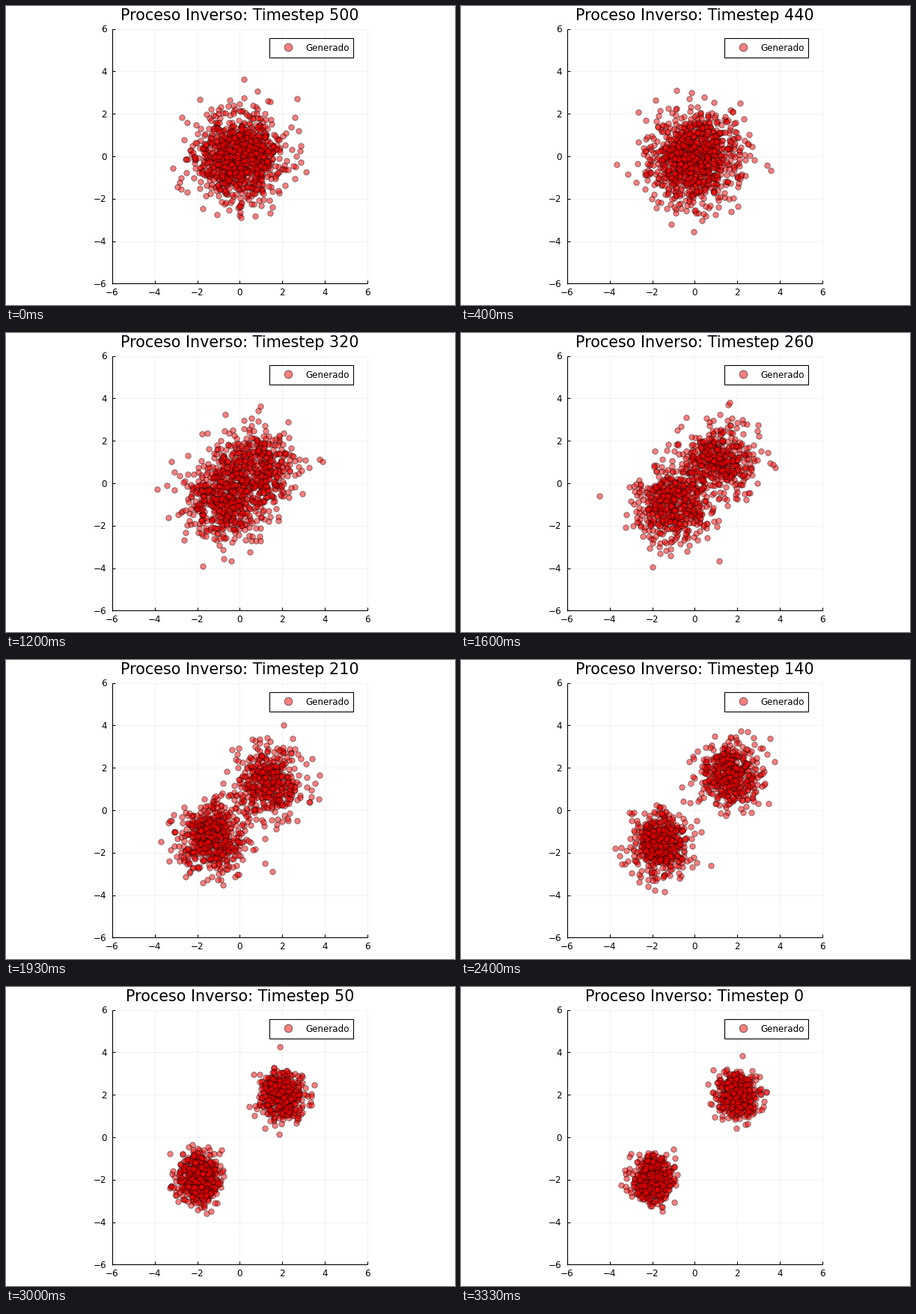
A matplotlib script for the animation above (3.39 s loop, 600 by 400 pixels).

```python
import numpy as np
import matplotlib.pyplot as plt
from matplotlib.animation import FuncAnimation
from matplotlib.patches import Rectangle

W, H, DPI = 600, 400, 100
PT = 72 / DPI                      # points per pixel
LOOP_MS, TICK_MS = 3390, 30
HOLD_MS = 1000 / 15                # time each picture stays
STEPS, STRIDE = 51, 10
T_MAX = (STEPS - 1) * STRIDE
BETA_MIN, BETA_MAX = 1e-4, 0.018
N_POINTS, N_LOW = 1000, 540
CENTRE, SPREAD = 2, 0.5
X0, Y0, UNIT = 312.4, 201, 28.4    # plot centre and pixels per unit
LIMIT = 6
RED, EDGE = (1, 0, 0, 0.5), (0, 0, 0, 0.5)


def alpha_bar(t):
    """Share of the signal variance left at timestep t (linear beta schedule)."""
    return np.exp(-(BETA_MIN * t + (BETA_MAX - BETA_MIN) * t * t / (2 * T_MAX)))


def diffuse():
    """Blur two Gaussian clusters step by step; returns step x point x coordinate."""
    rng = np.random.default_rng(12)
    side = rng.permutation(np.where(np.arange(N_POINTS) < N_LOW, -1, 1))[:, None]
    a = alpha_bar(np.arange(STEPS) * STRIDE)
    path = [CENTRE * side + SPREAD * rng.standard_normal((N_POINTS, 2))]
    for keep in a[1:] / a[:-1]:
        noise = rng.standard_normal((N_POINTS, 2))
        path.append(np.sqrt(keep) * path[-1] + np.sqrt(1 - keep) * noise)
    return np.array(path)


def to_px(p):
    return np.array([X0, Y0]) + UNIT * np.asarray(p) * [1, -1]


def line(xs, ys, width, **style):
    ax.plot(xs, ys, color="black", lw=width * PT, solid_capstyle="butt", **style)


def label(x, y, text, size=11.9, ha="center"):
    return ax.text(x, y, text, fontsize=size * PT, ha=ha, va="baseline",
                   family="DejaVu Sans", color="black", zorder=6)


def draw_dots(xy, size, edge, zorder):
    return ax.scatter(*np.transpose(xy), s=(size * PT) ** 2, c=[RED],
                      edgecolors=[EDGE], linewidths=edge * PT, zorder=zorder)


def draw_axes():
    left, bottom = to_px((-LIMIT, -LIMIT))
    right, top = to_px((LIMIT, LIMIT))
    for v in range(-LIMIT, LIMIT + 1, 2):
        x, y = to_px((v, v))
        line([x, x], [top, bottom], 0.7, alpha=0.07, zorder=1)
        line([left, right], [y, y], 0.7, alpha=0.07, zorder=1)
        line([x, x], [bottom, bottom - 4], 1.1, zorder=2)
        line([left, left + 4], [y, y], 1.1, zorder=2)
        text = str(v).replace("-", "\u2212")
        label(x, 387, text)
        label(134.5, y + 4.5, text, ha="right")
    line([left, left], [top, bottom + 0.5], 1.1, zorder=2)
    line([left, right], [bottom, bottom], 1.1, zorder=2)


def draw_legend():
    ax.add_patch(Rectangle((352, 42.6), 112.2, 26, fc="white", ec="black",
                           lw=1.1 * PT, zorder=4))
    draw_dots([(377.2, 55.2)], 10.5, 1.1, zorder=5)
    label(400.4, 59.6, "Generado", ha="left")


fig = plt.figure(figsize=(W / DPI, H / DPI), dpi=DPI, facecolor="white")
ax = fig.add_axes([0, 0, 1, 1])
ax.set(xlim=(0, W), ylim=(H, 0))
ax.axis("off")

draw_axes()
draw_legend()
path = diffuse()
title = label(X0, 19, "", size=20.8)
dots = draw_dots(to_px(path[-1]), 7.4, 0.9, zorder=3)


def update(tick):
    # Show the picture that falls due before the tick ends.
    step = STEPS - 1 - int((tick + 0.8) * TICK_MS / HOLD_MS)
    title.set_text(f"Proceso Inverso: Timestep {step * STRIDE}")
    dots.set_offsets(to_px(path[step]))
    return title, dots


anim = FuncAnimation(fig, update, frames=LOOP_MS // TICK_MS, interval=TICK_MS,
                     repeat=True, repeat_delay=0)
plt.show()
```
